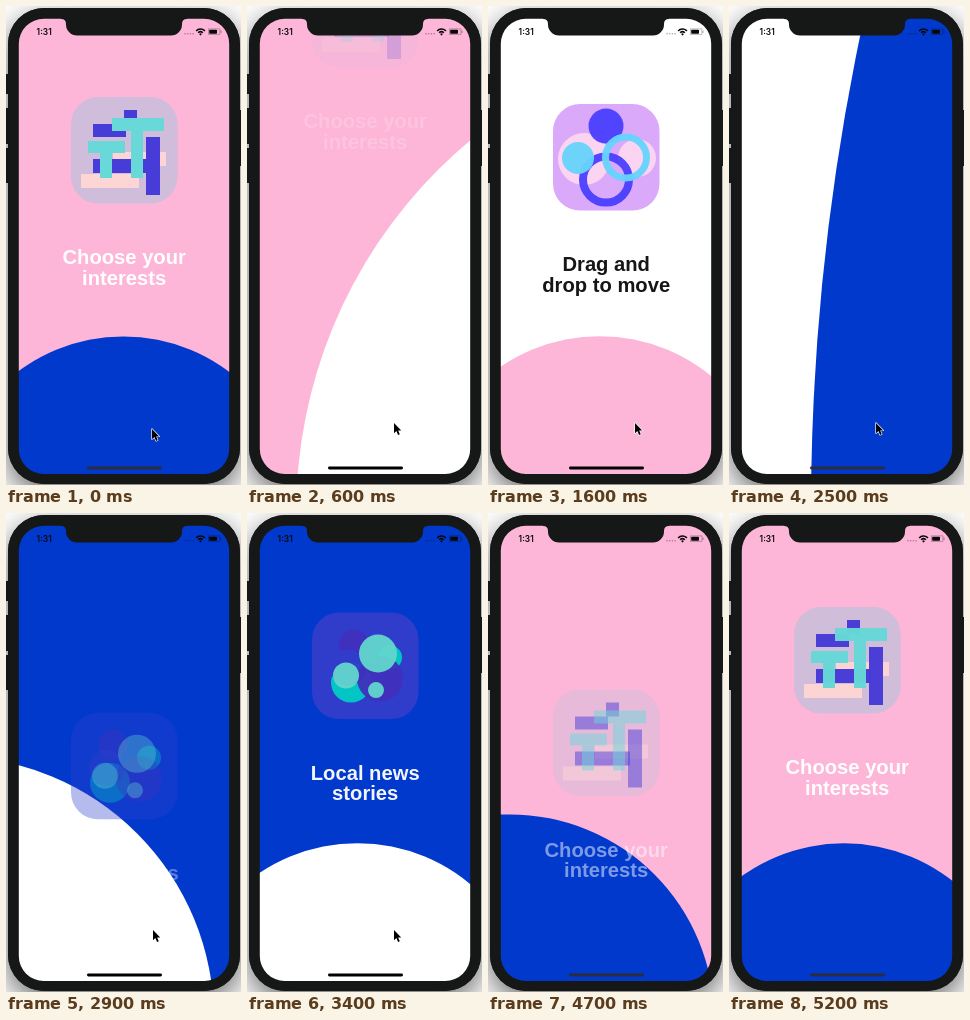
Write an HTML page with a canvas that moves like this. It is 235 px wide and 479 px high and loops after 5300 ms.

```html
<!DOCTYPE html>
<html>
<head>
<meta charset="utf-8">
<title>Onboarding</title>
<style>
html, body { margin: 0; width: 100%; height: 100%; overflow: hidden; }
canvas { display: block; }
</style>
</head>
<body>
<canvas id="stage" width="235" height="479"></canvas>
<script>
const ctx = document.getElementById('stage').getContext('2d');
const LOOP = 5300, STARTS = [68, 1886, 3607], DURATION = 1710;
const PX = 0.56;              // stage pixels per device point
const MID = 118, BASE_Y = 506, RADIUS = 175;
const PINK = '#fdb5d8', WHITE = '#fff', BLUE = '#0039cc', INDIGO = '#483cd8', CASE = '#161817';

function rect(color, x, y, w, h, r = 0) {
  ctx.fillStyle = color;
  ctx.beginPath();
  ctx.roundRect(x, y, w, h, r);
  ctx.fill();
}

function disc(color, x, y, r) {
  ctx.fillStyle = color;
  ctx.beginPath();
  ctx.arc(x, y, r, 0, 7);
  ctx.fill();
}

function ring(color, x, y, r, width) {
  ctx.strokeStyle = color;
  ctx.lineWidth = width;
  ctx.beginPath();
  ctx.arc(x, y, r, 0, 7);
  ctx.stroke();
}

function barsIcon() {
  const peach = '#fcd5d4', teal = '#68d8d8';
  rect(peach, 75, 168, 58, 14);
  rect(peach, 107, 146, 53, 14);
  rect(INDIGO, 118, 104, 13, 14);
  rect(INDIGO, 87, 118, 33, 13);
  rect(INDIGO, 87, 153, 55, 14);
  rect(INDIGO, 140, 131, 14, 58);
  rect(teal, 106, 112, 52, 13);
  rect(teal, 125, 125, 12, 47);
  rect(teal, 82, 135, 37, 12);
  rect(teal, 94, 147, 12, 25);
}

function ringsIcon() {
  const light = '#fcd7f1', cyan = '#68d4fc', violet = '#4c40ff';
  disc(light, 96, 146, 26);
  disc(light, 149, 145, 19);
  disc(violet, 118, 113, 17.5);
  ring(violet, 118, 166.5, 23, 8);
  disc(cyan, 90, 145, 16);
  ring(cyan, 138, 144.5, 20.5, 7);
}

function bubblesIcon() {
  const teal = '#00cdc4', mint = '#62d6ce', dark = '#4130bd';
  disc(dark, 107, 123, 15);
  disc(teal, 143, 136, 12);
  disc(teal, 104, 161, 20);
  disc('#323ecb', 101, 146, 18);
  disc(dark, 133, 157, 23);
  disc(mint, 131, 132, 19);
  disc(mint, 99, 154, 13);
  disc(mint, 129, 168.5, 8);
}

const PAGES = [
  { color: PINK, ink: WHITE, tile: '#d0bddb', icon: barsIcon, lines: ['Choose your', 'interests'] },
  { color: WHITE, ink: '#0c0c0c', tile: '#d9a6fa', icon: ringsIcon, lines: ['Drag and', 'drop to move'] },
  { color: BLUE, ink: WHITE, tile: '#323ecb', icon: bubblesIcon, lines: ['Local news', 'stories'] },
];

// Short acceleration, longer deceleration.
function ease(u) {
  const turn = 0.32;
  return u < turn ? u * u / turn : 1 - (1 - u) ** 2 / (1 - turn);
}

// away: 0 at rest, 1 fully gone; dir: -1 leaves upwards, 1 enters from below
function drawPage(page, away, dir) {
  const opacity = Math.max(0, 1 - away * 4 / 3);
  if (!opacity) return;
  ctx.save();
  ctx.globalAlpha = opacity;
  ctx.translate(0, dir * away * 400 * PX);
  rect(page.tile, 65, 91, 106.5, 106.5, 27);
  page.icon();
  ctx.fillStyle = page.ink;
  ctx.font = 'bold 20.2px "Liberation Sans", Arial, sans-serif';
  ctx.textAlign = 'center';
  page.lines.forEach((line, i) => ctx.fillText(line, MID + 0.2, 258.3 + i * 20.4));
  ctx.restore();
}

function drawScreen(from, to, progress) {
  const growing = progress < 0.5;
  const swell = growing ? progress * 2 : 2 - progress * 2;
  const [back, front] = growing ? [from, to] : [to, from];
  const side = growing ? 1 : -1;
  const r = RADIUS + PX * 2 ** (15 * swell);
  rect(back.color, 12, 12, 212, 457);
  disc(front.color, MID + side * (r - (1 - swell) * RADIUS), BASE_Y, r);
  drawPage(back, swell, -side);
  rect(front.color === BLUE ? '#2c2c3c' : '#000', 81, 460.6, 75, 2.8, 1.4);
}

function drawStatus() {
  const ink = '#080808', faint = 'rgba(0,0,0,.35)';
  ctx.fillStyle = ink;
  ctx.font = '600 8.4px Inter, sans-serif';
  ctx.textAlign = 'left';
  ctx.fillText('1:31', 30.6, 29);
  for (let i = 0; i < 4; i++) disc(faint, 179 + i * 2.7, 27.8, 0.8);
  ctx.strokeStyle = ink;
  ctx.lineWidth = 1.5;
  for (const r of [3.2, 6]) {
    ctx.beginPath();
    ctx.arc(194.5, 29, r, -Math.PI * 0.76, -Math.PI * 0.24);
    ctx.stroke();
  }
  disc(ink, 194.5, 28.3, 1.1);
  ctx.lineWidth = 0.7;
  ctx.strokeStyle = faint;
  ctx.strokeRect(202.4, 22.9, 11.5, 5.7);
  rect(ink, 203.2, 23.7, 7.8, 4.1, 0.8);
  rect(faint, 214.5, 24.6, 1, 2.3);
}

function drawBackdrop() {
  rect(WHITE, 0, 0, 235, 479);
  ctx.save();
  ctx.shadowColor = 'rgba(0,0,0,.6)';
  ctx.shadowBlur = 30;
  ctx.shadowOffsetY = 10;
  rect(CASE, 2, 2, 232, 476, 36);
  ctx.restore();
  for (const [y, h] of [[68, 20], [102, 36], [142, 35]]) rect(CASE, 0, y, 4, h);
  rect(CASE, 232, 104, 3, 56);
}

// Bezel and notch lie over the screen, so its edge stays clean.
function drawBezel() {
  ctx.fillStyle = CASE;
  ctx.beginPath();
  ctx.roundRect(2, 2, 232, 476, 36);
  ctx.roundRect(12.8, 12.8, 210.4, 455.2, 25);
  ctx.fill('evenodd');
  ctx.beginPath();
  ctx.moveTo(55, 12);
  ctx.lineTo(55, 13);
  ctx.quadraticCurveTo(60, 13, 60, 18);
  ctx.arcTo(60, 29.5, 72, 29.5, 11);
  ctx.arcTo(176, 29.5, 176, 18, 11);
  ctx.lineTo(176, 18);
  ctx.quadraticCurveTo(176, 13, 181, 13);
  ctx.lineTo(181, 12);
  ctx.fill();
}

function drawCursor(t) {
  if (t > 3700) return;
  const move = Math.min(1, Math.max(0, (t - 60) / 240));
  ctx.save();
  ctx.translate(146 + move, 423 - 6 * move);
  ctx.scale(0.85, 0.85);
  const arrow = new Path2D('M0 0V12L2.8 9.5L4.8 14L6.8 13.1L4.9 8.7H8.5Z');
  ctx.strokeStyle = WHITE;
  ctx.lineWidth = 1.5;
  ctx.lineJoin = 'round';
  ctx.stroke(arrow);
  ctx.fillStyle = '#000';
  ctx.fill(arrow);
  ctx.restore();
}

const begin = performance.now();

function frame() {
  const t = (performance.now() - begin) % LOOP;
  const clock = t < STARTS[0] ? t + LOOP : t;
  const step = STARTS.findLastIndex(start => clock >= start);
  const progress = ease(Math.min(1, (clock - STARTS[step]) / DURATION));

  drawBackdrop();
  ctx.save();
  ctx.beginPath();
  ctx.roundRect(12, 12, 212, 457, 25);
  ctx.clip();
  drawScreen(PAGES[step], PAGES[(step + 1) % 3], progress);
  drawStatus();
  ctx.restore();
  drawBezel();
  drawCursor(t);
  requestAnimationFrame(frame);
}
frame();
</script>
</body>
</html>
```
